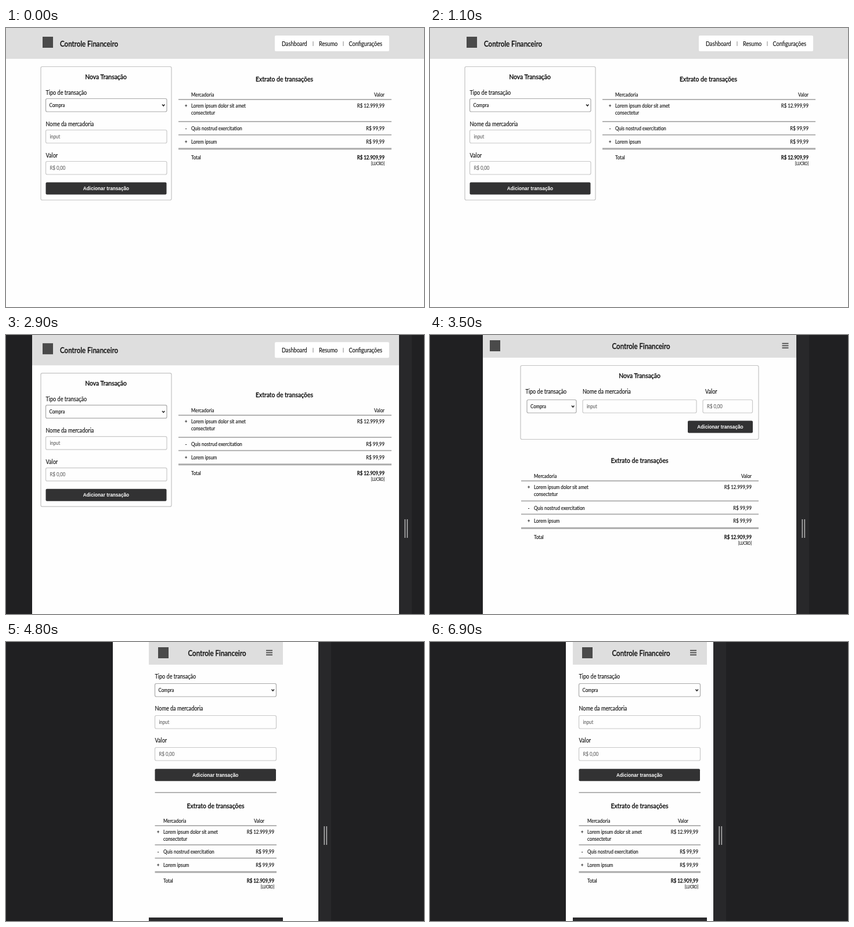
Recreate the animation shown at these times as an HTML page. Size 720 by 480 pixels, loop 7400 ms.

```html
<!DOCTYPE html>
<html lang="pt-BR">
<head>
<meta charset="utf-8">
<title>Controle Financeiro</title>
<style>
html, body { margin: 0; width: 100%; height: 100%; overflow: hidden; background: #fefefe; }
svg { display: block; width: 720px; height: 480px; font-family: Lato, sans-serif; }
</style>
</head>
<body>
<svg id="stage" viewBox="0 0 720 480"></svg>
<script>
const LOOP = 7400, STEP = 100;
const SQUASH = 0.85; // the page is shown narrower than its natural aspect
const INK = '#111', DARK = '#202022', RULE = '#ababab', PAPER = '#fefefe';
const SANS = "'Liberation Sans', Arial, sans-serif";
const TIP = "'Open Sans', sans-serif";

const rect = (x, y, w, h, fill, extra = '') =>
  `<rect x="${x}" y="${y}" width="${w}" height="${h}" fill="${fill}" ${extra}/>`;
const outline = (x, y, w, h, stroke = '#c2c2c2') =>
  rect(x, y, w, h, PAPER, `rx="2.5" stroke="${stroke}" stroke-width="1.2"`);
const rule = (x0, x1, y, h = 1.8) => rect(x0, y - h / 2, x1 - x0, h, RULE);
const group = (id, ...parts) => `<g id="${id}">${parts.join('')}</g>`;

function text(x, y, size, str, { anchor = 'start', fill = INK, weight = 400, font } = {}) {
  const family = font ? `font-family="${font}"` : '';
  const stroke = weight === 500 ? 0.35 : weight === 400 ? 0.15 : 0;
  return `<text transform="translate(${x} ${y}) scale(${SQUASH} 1)" font-size="${size}" ` +
    `text-anchor="${anchor}" fill="${fill}" stroke="${fill}" stroke-width="${stroke}" ` +
    `font-weight="${weight}" ${family}>${str}</text>`;
}
const heading = (x, y, str) => text(x, y, 12.2, str, { anchor: 'middle', weight: 500 });

function field(x, y, w, label, value, { select = false, labelX = x, labelGap = 7 } = {}) {
  const arrow = `<path d="M${x + w - 8} ${y + 10}l2.2 2.5l2.2 -2.5" fill="none" stroke="#222" stroke-width="1.5"/>`;
  return text(labelX, y - labelGap, 10.7, label) +
    outline(x, y, w, 22.5, select ? '#aaa' : '#c8c8c8') +
    text(x + (select ? 6 : 7), y + 14.5, 9.2, value, { fill: select ? INK : '#666' }) +
    (select ? arrow : '');
}

const button = (x, y, w) =>
  rect(x, y, w, 21, '#323233', 'rx="2"') +
  text(x + w / 2, y + 13.7, 9.7, 'Adicionar transação',
    { anchor: 'middle', fill: '#fff', weight: 700, font: SANS });

// y: rule under the column names, gap: distance to the rule under the first row
function table(x0, x1, y, gap, { indent = 22, pad = 12, valueX = x1 - pad } = {}) {
  const left = x0 + indent, right = x1 - pad, low = y + gap;
  const cell = (ty, str, weight) => text(left, ty, 9.3, str, { weight });
  const value = (ty, str, weight) => text(right, ty, 9.3, str, { anchor: 'end', weight });
  const sign = (ty, str) => text(left - 9, ty, 8.5, str, { anchor: 'middle', weight: 700 });
  return cell(y - 5, 'Mercadoria') +
    text(valueX, y - 5, 9.3, 'Valor', { anchor: 'end' }) +
    rule(x0, x1, y) +
    sign(y + 14.4, '+') + cell(y + 14.4, 'Lorem ipsum dolor sit amet') +
    cell(y + 25.7, 'consectetur') + value(y + 14.4, 'R$ 12.999,99') +
    rule(x0, x1, low) +
    sign(low + 15, '-') + cell(low + 15, 'Quis nostrud exercitation') + value(low + 15, 'R$ 99,99') +
    rule(x0, x1, low + 22.8) +
    sign(low + 37.5, '+') + cell(low + 37.5, 'Lorem ipsum') + value(low + 37.5, 'R$ 99,99') +
    rule(x0, x1, low + 46.8, 3) +
    cell(low + 65, 'Total') + value(low + 65, 'R$ 12.909,99', 500) +
    text(right, low + 75, 7, '[LUCRO]', { anchor: 'end' });
}

const logo = (x, y) => rect(x, y, 18, 19, '#4a4a4a');
const burger = (x, y) => [0, 3.8, 7.6].map(d => rect(x, y + d, 11, 1.8, '#4a4a4a')).join('');
const brand = (x, y, anchor) => text(x, y, 13.6, 'Controle Financeiro', { anchor, weight: 500 });
const bar = (x, w, h) => rect(x, 0, w, h, '#dedede');

const navLink = (x, str) => text(x, 30.5, 10.8, str);
const desktop = group('desktop',
  bar(0, 720, 53), logo(63, 15), brand(93, 31.5),
  rect(463, 13, 197, 27, '#fff', 'rx="2"'),
  navLink(475, 'Dashboard'), navLink(539, 'Resumo'), navLink(590.5, 'Configurações'),
  rect(528.5, 23, 1, 8, '#888'), rect(580.5, 23, 1, 8, '#888'),
  outline(60, 66.5, 225, 229.5), heading(172, 88, 'Nova Transação'),
  field(68.5, 121.5, 208.5, 'Tipo de transação', 'Compra', { select: true }),
  field(68.5, 175.5, 208.5, 'Nome da mercadoria', 'input'),
  field(68.5, 229.5, 208.5, 'Valor', 'R$ 0,00'),
  button(68.5, 265.5, 208));

const statement = group('statement',
  heading(479.5, 92, 'Extrato de transações'), table(297, 664, 123, 38));

const tablet = group('tablet',
  bar(0, 720, 39), group('tabletLogo', logo(12, 9)), group('tabletMenu', burger(-24.5, 13.7)),
  brand(363.5, 23.5, 'middle'),
  outline(156, 52.5, 410, 127), heading(361, 74, 'Nova Transação'),
  field(167, 111.5, 85, 'Tipo de transação', 'Compra', { select: true, labelX: 164.5, labelGap: 10.5 }),
  field(263, 111.5, 196, 'Nome da mercadoria', 'input', { labelGap: 10.5 }),
  field(470, 111.5, 85.5, 'Valor', 'R$ 0,00', { labelX: 474, labelGap: 10.5 }),
  button(444, 147.5, 112),
  heading(361, 220, 'Extrato de transações'), table(157, 566, 251, 34.5));

const mobile = group('mobile',
  bar(246, 231, 39), logo(262, 9), brand(363.5, 23.5, 'middle'), burger(448, 13.7),
  field(256.5, 71.5, 209, 'Tipo de transação', 'Compra', { select: true, labelGap: 8.2 }),
  field(256.5, 126.5, 209, 'Nome da mercadoria', 'input', { labelGap: 8.2 }),
  field(256.5, 181.5, 209, 'Valor', 'R$ 0,00', { labelGap: 8.2 }),
  button(256.5, 218.3, 208.5), rule(256.5, 466, 259),
  heading(361, 285.5, 'Extrato de transações'),
  table(256.5, 466, 316, 33, { indent: 14.5, pad: 4, valueX: 445 }),
  rect(246, 474, 231, 6, '#2a2a2c'));

const inspector = group('inspector',
  rect(285, 67, 377, 413, '#6fa8dc', 'opacity=".66"'),
  `<path d="M288 20H417Q420 20 420 23V54Q420 57 417 57H314L305 67L296 57H288Q285 57 285 54V23Q285 20 288 20Z" fill="#fff" filter="url(#shadow)"/>`,
  text(294, 45.5, 15.3, 'section', { fill: '#881280', weight: 700, font: TIP }),
  text(351, 45.5, 15.3, '672 × 890', { fill: '#777', font: TIP }));

const device = group('device',
  group('leftSide', rect(-720, 0, 720, 480, DARK)),
  group('rightSide', rect(0, 0, 720, 480, DARK), rect(0, 0, 22, 480, '#28282a'),
    rect(9.5, 317, 1.6, 32, '#b0b0b0'), rect(13.5, 317, 1.6, 32, '#b0b0b0')));

const stage = document.getElementById('stage');
stage.innerHTML =
  `<defs><filter id="shadow" x="-10%" y="-20%" width="120%" height="150%">
    <feDropShadow dx="0" dy="1" stdDeviation="2" flood-opacity=".35"/></filter></defs>` +
  rect(0, 0, 720, 480, PAPER) + desktop + statement + tablet + mobile + inspector + device;

const el = id => document.getElementById(id);
const show = (id, on) => el(id).setAttribute('display', on ? 'inline' : 'none');
const move = (id, x, y = 0) => el(id).setAttribute('transform', `translate(${x} ${y})`);

// [time, left edge of the resized page]
const EDGE = [[2000, 0], [2300, 4], [2500, 11], [2700, 26], [2900, 45], [3500, 91], [4100, 130],
  [4300, 138], [4800, 184], [5100, 215], [5200, 224], [5300, 231], [5400, 234]];

function leftEdge(t) {
  const i = EDGE.findIndex(key => key[0] > t);
  if (i === 0) return 0;
  if (i < 0) return EDGE[EDGE.length - 1][1];
  const [t0, x0] = EDGE[i - 1], [t1, x1] = EDGE[i];
  return Math.round(x0 + (x1 - x0) * (t - t0) / (t1 - t0));
}

function render(t) {
  const resizing = t >= 2000, left = leftEdge(t), right = 722 - left;
  const layout = left < 66 ? 'desktop' : left < 145 ? 'tablet' : 'mobile';
  for (const id of ['desktop', 'tablet', 'mobile']) show(id, id === layout);
  show('statement', layout === 'desktop');
  show('inspector', t >= 700 && t < 1100);
  show('device', resizing);
  move('desktop', 0, resizing ? -0.8 : 0);
  move('statement', 0, left >= 20 ? 15 : 0);
  move('tabletLogo', left);
  move('tabletMenu', right);
  move('leftSide', left);
  move('rightSide', right);
}

const start = performance.now();
function tick() {
  const t = (performance.now() - start) % LOOP;
  render(Math.floor(t / STEP) * STEP);
  requestAnimationFrame(tick);
}
tick();
</script>
</body>
</html>
```
